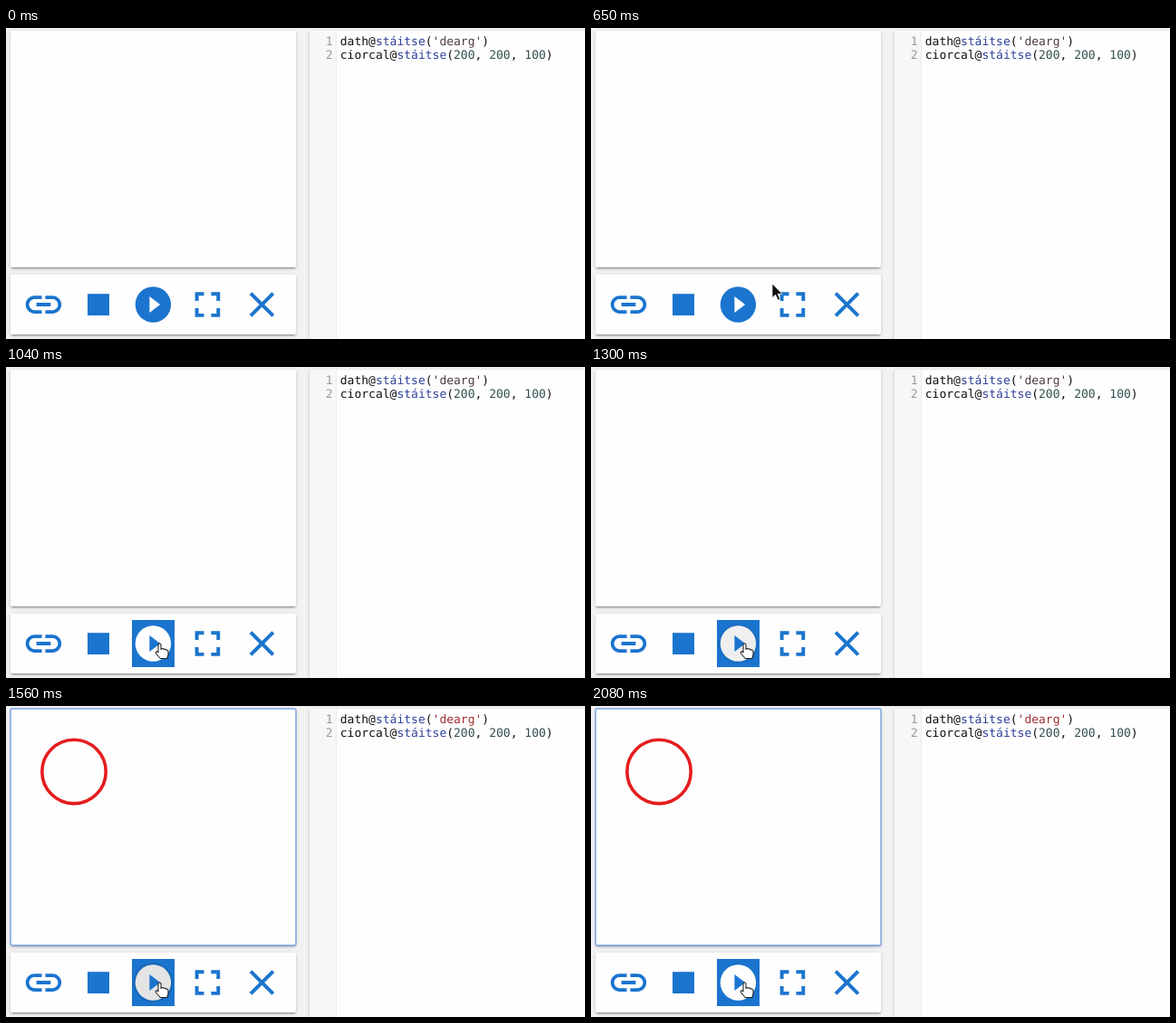
Recreate the animation shown at these times as an HTML page. Size 639 px wide and 343 px high, loop 3120 ms.

```html
<!DOCTYPE html>
<html lang="ga">
<head>
<meta charset="utf-8">
<title>Ciorcal</title>
<style>
  html, body { margin: 0; width: 100%; height: 100%; overflow: hidden; background: #f2f2f2; }
  #stage { position: absolute; inset: 0; overflow: hidden; contain: strict; }
  .card {
    position: absolute; background: #fefefe; border-radius: 2px;
    box-shadow: 0 2px 2px rgba(0,0,0,.14), 0 3px 1px -2px rgba(0,0,0,.2), 0 1px 5px rgba(0,0,0,.12);
  }
  #canvas { left: 5px; top: 3px; width: 315px; height: 261px; }
  #tools { left: 5px; top: 272px; width: 315px; height: 66px; }
  #editor { left: 335px; top: 3px; right: 0; bottom: 0; border-radius: 0; }
  svg { position: absolute; left: 0; top: 0; display: block; overflow: hidden; }
  .soft { filter: blur(.4px); }
  text { font: 13px "DejaVu Sans Mono", monospace; white-space: pre; fill: #111; text-rendering: geometricPrecision; }
  .line { fill: #999; }
  .def { fill: #2f419a; }
  .num { fill: #34504f; }
  .icon { fill: #1b74ce; }
</style>
</head>
<body>
<div id="stage">
<div class="card" id="canvas"></div>
<div class="card" id="tools"></div>
<div class="card" id="editor"></div>
<svg width="639" height="343" viewBox="0 0 639 343">
  <rect x="335" y="3" width="30" height="340" fill="#f7f7f7"/>
  <rect x="364" y="3" width="1" height="340" fill="#ececec"/>
  <g class="soft">
    <text class="line" x="352.7" y="18.6">1</text>
    <text class="line" x="352.7" y="33.6">2</text>
    <text x="368.8" y="18.6">dath@<tspan class="def">stáitse</tspan>(<tspan id="string">'dearg'</tspan>)</text>
    <text x="368.8" y="33.6">ciorcal@<tspan class="def">stáitse</tspan>(<tspan class="num">200</tspan>, <tspan class="num">200</tspan>, <tspan class="num">100</tspan>)</text>
  </g>

  <g id="drawing" fill="none">
    <rect x="5" y="3" width="315" height="261" rx="1.5" stroke="#7fa5de" stroke-width="1.5"/>
    <circle cx="75" cy="72.4" r="35.2" stroke="#e51c1e" stroke-width="3.6"/>
  </g>

  <g class="icon soft">
    <path transform="translate(17.8 281.4) scale(1.97)" d="M3.9 12c0-1.71 1.39-3.1 3.1-3.1h4V7H7c-2.76 0-5 2.24-5 5s2.24 5 5 5h4v-1.9H7c-1.71 0-3.1-1.39-3.1-3.1zM8 13h8v-2H8v2zm9-6h-4v1.9h4c1.71 0 3.1 1.39 3.1 3.1s-1.39 3.1-3.1 3.1h-4V17h4c2.76 0 5-2.24 5-5s-2.24-5-5-5z"/>
    <rect x="90" y="293.2" width="24" height="23.8"/>
    <rect id="hover" x="139" y="279" width="47" height="52"/>
    <circle id="disc" cx="162.4" cy="305" r="19.7"/>
    <circle id="ripple" cx="162.4" cy="305" r="22" fill="#000"/>
    <path id="play" d="M158.4 296.1v17.8l11.8-8.9z"/>
    <path transform="translate(198.8 281.4) scale(1.97)" d="M7 14H5v5h5v-2H7v-3zm-2-4h2V7h3V5H5v5zm12 7h-3v2h5v-5h-2v3zM14 5v2h3v3h2V5h-5z"/>
    <path transform="translate(258.8 281.4) scale(1.97)" d="M19 6.41L17.59 5 12 10.59 6.41 5 5 6.41 10.59 12 5 17.59 6.41 19 12 13.41 17.59 19 19 17.59 13.41 12z"/>
  </g>

  <path id="arrow" d="M0 0V15.5l3.6-3.3 2.7 6 2.5-1.1-2.7-5.8h5z" fill="#111" stroke="#fff" stroke-width=".7"/>
  <path id="hand" d="M-1.5 1.5C-1.5-.5 1.5-.5 1.5 1.5V6.5C2 5 4 5.5 4.3 6.3 5 5.8 6.6 6 7 7.2 8 6.7 9.5 7.2 9.5 9V12.5L8.3 16.5H.8L-4 11C-5 9.3-3 8-1.5 9.8z" fill="#fff" stroke="#222" stroke-width="1.1" stroke-linejoin="round"/>
</svg>
</div>
<script>
  const STEP = 130, LOOP = 3120;
  const pointerPath = [[229, 263], [216, 272], [200, 282], [185, 291], [174, 301], [169.5, 305]];
  const rippleAlpha = [.06, .13, .1, .06, .03, .015];
  const el = id => document.getElementById(id);
  const show = (id, on) => el(id).setAttribute('visibility', on ? 'visible' : 'hidden');

  function render(now) {
    const step = Math.floor((now % LOOP) / STEP);
    const move = step - 3, press = step - 10;
    const hovered = move >= 3, drawn = step >= 12;

    show('arrow', move >= 0 && move < 4);
    show('hand', move >= 4);
    const [x, y] = pointerPath[Math.max(0, Math.min(move, 5))];
    for (const id of ['arrow', 'hand']) el(id).setAttribute('transform', `translate(${x} ${y})`);

    show('hover', hovered);
    el('disc').style.fill = hovered ? '#fefefe' : '#1b74ce';
    el('play').style.fill = hovered ? '#1b74ce' : '#fefefe';
    el('ripple').style.opacity = rippleAlpha[press] || 0;

    show('drawing', drawn);
    el('string').style.fill = drawn ? '#a03030' : '#503c3c';
    requestAnimationFrame(() => render(performance.now()));
  }
  render(0);
</script>
</body>
</html>
```
